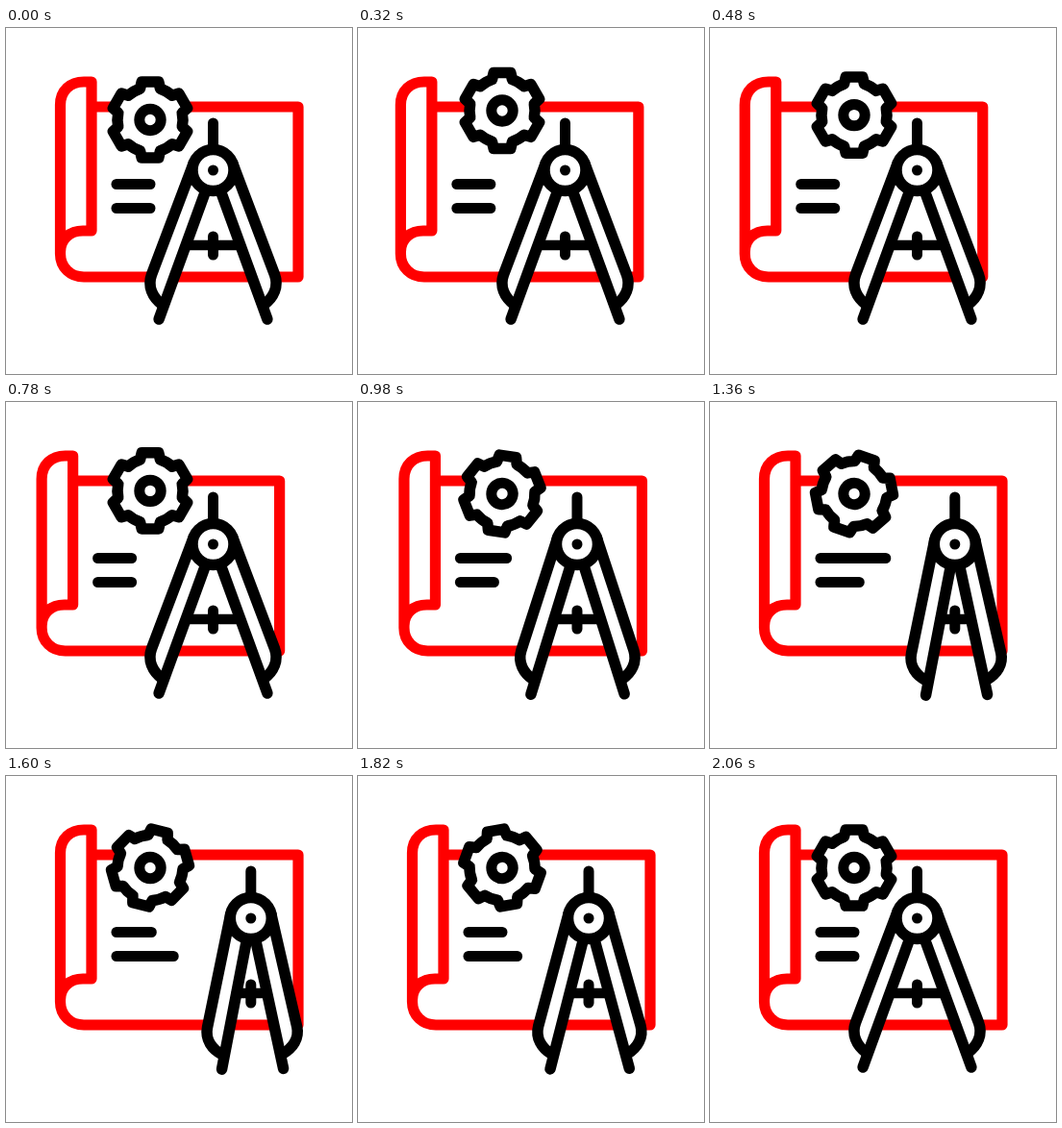
Write an HTML page with a canvas that moves like this. It is 360 by 360 pixels and loops after 2.4 s.

```html
<!DOCTYPE html>
<html lang="en">
<head>
<meta charset="utf-8">
<title>Blueprint icon</title>
<style>
html, body { margin: 0; width: 100%; height: 100%; overflow: hidden; background: #fff; }
canvas { display: block; width: 360px; height: 360px; }
</style>
</head>
<body>
<canvas id="stage"></canvas>
<script>
const LOOP = 2400;
const BEAT = 412;
const HOP = 416;
const RAD = Math.PI / 180;
const RED = '#ff0000';
const BLACK = '#000';
const BOLD = 11.5;

const canvas = document.getElementById('stage');
const ctx = canvas.getContext('2d');
const scale = window.devicePixelRatio || 1;
canvas.width = canvas.height = 360 * scale;

const clamp = v => Math.max(0, Math.min(1, v));
// Eased progress from time a to time b
const ease = (t, a, b) => (1 - Math.cos(Math.PI * clamp((t - a) / (b - a)))) / 2;
// Out and back: rise during a..b, fall during c..d
const swing = (t, a, b, c, d) => ease(t, a, b) - ease(t, c, d);

function stroke(color, width) {
  ctx.strokeStyle = color;
  ctx.lineWidth = width;
  ctx.stroke();
}

function line(x1, y1, x2, y2, width = 11) {
  ctx.beginPath();
  ctx.moveTo(x1, y1);
  ctx.lineTo(x2, y2);
  stroke(BLACK, width);
}

function disc(x, y, r, color) {
  ctx.beginPath();
  ctx.arc(x, y, r, 0, Math.PI * 2);
  ctx.fillStyle = color;
  ctx.fill();
}

function ring(r, width) {
  disc(0, 0, r, '#fff');
  stroke(BLACK, width);
}

function drawPaper(grow1, grow2) {
  ctx.beginPath();
  ctx.moveTo(89, 82);
  ctx.lineTo(304, 82);
  ctx.lineTo(304, 259);
  ctx.lineTo(81, 259);
  ctx.bezierCurveTo(67, 259, 56.5, 249, 56.5, 235);
  ctx.lineTo(56.5, 80);
  ctx.bezierCurveTo(56.5, 65, 67, 56, 81, 56);
  ctx.lineTo(89, 56);
  ctx.lineTo(89, 211);
  ctx.lineTo(80, 211);
  ctx.bezierCurveTo(67, 211, 56.5, 219, 56.5, 233);
  stroke(RED, 11.2);

  line(115, 162.5, 150 + grow1, 162.5);
  line(115, 187.5, 150 + grow2, 187.5);
}

function drawGear(lift, turn) {
  ctx.save();
  ctx.translate(150, 95.5 - lift);
  ctx.rotate(turn * RAD);
  ctx.beginPath();
  for (let i = 0; i < 6; i++) {
    const mid = i * 60 - 90;
    for (const side of [-12.5, 12.5]) {
      const a = (mid + side) * RAD;
      ctx.lineTo(40.5 * Math.cos(a), 40.5 * Math.sin(a));
    }
    ctx.arc(0, 0, 34, (mid + 18) * RAD, (mid + 42) * RAD);
  }
  ctx.closePath();
  ctx.fillStyle = '#fff';
  ctx.fill();
  stroke(BLACK, BOLD);
  ring(11.2, 11);
  ctx.restore();
}

function drawLeg(side, angle, stretch) {
  ctx.save();
  ctx.scale(side, 1);
  ctx.rotate(-angle * RAD);
  const rim = new Path2D();
  rim.moveTo(21.5, 0);
  rim.lineTo(23, 124 * stretch);
  rim.bezierCurveTo(23, 137 * stretch, 14, 146 * stretch, 2, 149.5 * stretch);
  const body = new Path2D(rim);
  body.lineTo(0, 20);
  ctx.fillStyle = '#fff';
  ctx.fill(body);
  ctx.strokeStyle = BLACK;
  ctx.lineWidth = BOLD;
  ctx.stroke(rim);
  line(0, 22, 0, 165 * stretch, BOLD);
  ctx.restore();
}

function drawCompass(p) {
  const left = 20 - 9.1 * p;
  const right = 20 - 7.8 * p;
  const stretch = 1 - 0.03 * p;
  ctx.save();
  ctx.translate(215.5 + 39.3 * p, 148);
  line(0, -49, 0, -22);
  drawLeg(-1, left, stretch);
  drawLeg(1, right, stretch);
  line(-78 * Math.tan(left * RAD), 78, 78 * Math.tan(right * RAD), 78, 10.5);
  line(0, 69, 0, 88);
  ring(21.5, BOLD);
  disc(0, 0, 5.5, BLACK);
  ctx.restore();
}

function draw(t) {
  ctx.setTransform(scale, 0, 0, scale, 0, 0);
  ctx.fillStyle = '#fff';
  ctx.fillRect(0, 0, 360, 360);
  ctx.lineCap = ctx.lineJoin = 'round';

  const slide = 23 * swing(t, 0, 620, 620, 1240);
  const grow1 = 41.5 * swing(t, 2 * BEAT, 3 * BEAT, 3 * BEAT, 4 * BEAT);
  const grow2 = 25 * swing(t, 3 * BEAT, 4 * BEAT, 4 * BEAT, 5 * BEAT);
  ctx.save();
  ctx.translate(-slide, 0);
  drawPaper(grow1, grow2);
  ctx.restore();

  // The gear hops twice, then makes half a turn
  const hop = t < 2 * HOP ? (1 - Math.cos(2 * Math.PI * t / HOP)) / 2 : 0;
  drawGear(22 * hop, 180 * ease(t, 815, 2000));

  drawCompass(swing(t, 2 * BEAT, 3 * BEAT, 4 * BEAT, 5 * BEAT));
}

function tick() {
  draw(performance.now() % LOOP);
  requestAnimationFrame(tick);
}
tick();
</script>
</body>
</html>
```
